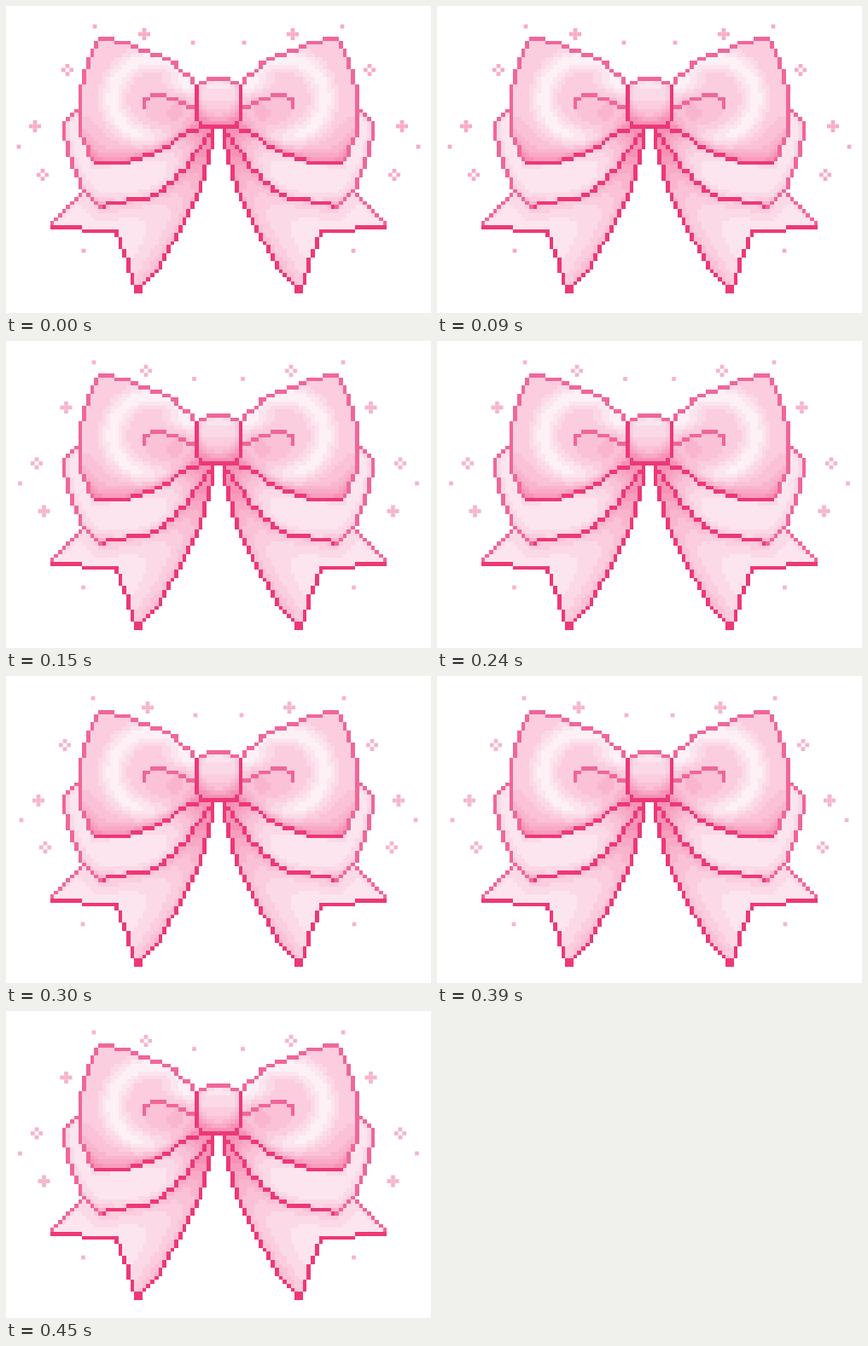
An HTML page with a canvas for the animation above (0.6 s loop, 498 by 360 pixels).

```html
<!DOCTYPE html>
<html lang="en">
<head>
<meta charset="utf-8">
<title>Pink bow</title>
<style>
  html, body { margin: 0; width: 100%; height: 100%; overflow: hidden; background: #fff; }
  canvas { display: block; }
</style>
</head>
<body>
<canvas id="stage" width="498" height="360"></canvas>
<script>
const ctx = document.getElementById('stage').getContext('2d');
const CELL = 4.7, MID = 249, TOP = 36, HALF = 42, ROWS = 64;
const DARK = '#ee3875', ROSE = '#f0669b';

const bow = document.createElement('canvas');
bow.width = HALF * 2;
bow.height = ROWS;
const pix = bow.getContext('2d');

// Each cell is painted together with its mirror image.
function put(col, row, color) {
  pix.fillStyle = color;
  pix.fillRect(HALF - 1 - col, row, 1, 1);
  pix.fillRect(HALF + col, row, 1, 1);
}
const toCell = ([x, y]) => [Math.floor((MID - x) / CELL), Math.floor((y - TOP) / CELL)];

// Catmull-Rom curve through a few key points.
function curve(...keys) {
  const out = [], steps = 3;
  for (let i = 0; i < keys.length - 1; i++) {
    const a = keys[Math.max(i - 1, 0)], b = keys[i], c = keys[i + 1];
    const d = keys[Math.min(i + 2, keys.length - 1)];
    for (let s = 0; s < steps; s++) {
      const t = s / steps;
      out.push([0, 1].map(k => b[k] + 0.5 * t * (c[k] - a[k] +
        t * (2 * a[k] - 5 * b[k] + 4 * c[k] - d[k] +
        t * (3 * b[k] - a[k] - 3 * c[k] + d[k])))));
    }
  }
  return [...out, keys[keys.length - 1]];
}

function line(points, color) {
  for (let i = 1; i < points.length; i++) {
    const [x0, y0] = toCell(points[i - 1]), [x1, y1] = toCell(points[i]);
    const n = Math.max(Math.abs(x1 - x0), Math.abs(y1 - y0), 1);
    for (let k = 0; k <= n; k++) {
      put(Math.round(x0 + (x1 - x0) * k / n), Math.round(y0 + (y1 - y0) * k / n), color);
    }
  }
}

// 0 is nearly white, 1 the deepest pink, in even steps.
function shade(tone) {
  const k = Math.round(Math.max(0, Math.min(1, tone)) * 8) / 8;
  return `rgb(${253 - 5 * k}, ${241 - 96 * k}, ${246 - 64 * k})`;
}

function fill(points, tone) {
  const path = new Path2D();
  points.forEach(p => path.lineTo(...p));
  path.closePath();
  for (let row = 0; row < ROWS; row++) {
    for (let col = 0; col < HALF; col++) {
      const x = MID - (col + 0.5) * CELL, y = TOP + (row + 0.5) * CELL;
      if (pix.isPointInPath(path, x, y)) put(col, row, shade(tone(x, y)));
    }
  }
}

// Light and shade: fading from an edge, or around a spot.
function nearEdge(points, x, y, reach) {
  let best = Infinity;
  for (let i = 1; i < points.length; i++) {
    const [ax, ay] = points[i - 1], [bx, by] = points[i];
    const dx = bx - ax, dy = by - ay;
    const t = ((x - ax) * dx + (y - ay) * dy) / (dx * dx + dy * dy || 1);
    const k = Math.max(0, Math.min(1, t));
    best = Math.min(best, Math.hypot(x - ax - k * dx, y - ay - k * dy));
  }
  return Math.exp(-best / reach);
}
const bell = v => Math.exp(-v * v);
const nearKnot = (x, y, reach) => bell(Math.hypot(x - 232, y - 138) / reach);

const loopTop = curve([87, 106], [91, 84], [98, 64], [112, 39], [125, 39], [152, 47],
  [188, 62], [212, 80], [222, 93]);
const loopSide = curve([87, 106], [87, 140], [94, 164], [104, 186]);
const loopHem = curve([104, 186], [140, 182], [176, 170], [206, 153], [240, 141]);
const crease = curve([163, 118], [166, 107], [180, 104], [202, 111], [222, 122]);
const underSide = curve([86, 122], [71, 130], [70, 150], [76, 184], [93, 217], [113, 234]);
const underHem = curve([113, 234], [148, 228], [184, 215], [206, 195], [224, 171], [241, 146]);
const tailTop = [[86, 220], [53, 256]];
const tailHem = [[53, 258], [130, 266]];
const tailSide = curve([130, 266], [139, 288], [147, 317], [153, 334]);
const tailEdge = curve([157, 334], [184, 295], [204, 265], [219, 235], [231, 204],
  [238, 176], [242, 146]);

fill([...tailTop, ...tailHem, ...tailSide, ...tailEdge, [200, 150]], (x, y) =>
  0.02 + 0.55 * nearEdge(tailEdge, x, y, 24) + 0.5 * nearEdge(underHem, x, y, 14) +
  0.2 * nearEdge(tailTop, x, y, 12) + 0.35 * nearKnot(x, y, 55));
line(tailTop, ROSE);
[tailHem, tailSide, tailEdge].forEach(p => line(p, DARK));

fill([...underSide, ...underHem, [200, 140]], (x, y) =>
  0.02 + 0.42 * nearEdge(underHem, x, y, 9) + 0.35 * nearEdge(underSide, x, y, 9) +
  0.25 * nearEdge(loopHem, x, y, 9) + 0.6 * nearKnot(x, y, 48));
line(underSide, ROSE);
line(underHem, DARK);

// A bright ring circles the crease of the upper loop.
fill([...loopTop, [240, 100], ...loopHem.slice().reverse(), ...loopSide.slice().reverse()], (x, y) => {
  const ring = Math.hypot((x - 174) / 49, (y - 108) / 47);
  const low = Math.max(0, Math.min(1, (y - 125) / 50));
  return 0.42 - 0.42 * bell((ring - 1) / 0.3) - 0.3 * bell(Math.hypot((x - 205) / 22, (y - 92) / 12)) +
    0.65 * nearEdge(loopHem, x, y, 9) + 0.45 * low * nearEdge(loopSide, x, y, 12) +
    0.6 * nearKnot(x, y, 38);
});
line(loopTop, ROSE);
line(loopSide, ROSE);
line(loopHem, DARK);
line(crease, ROSE);

const knotTop = [[248, 85], [235, 85], [231, 90], [227, 90], [223, 95]];
const knotSide = [[223, 95], [223, 130], [228, 136]];
fill([[249, 85], ...knotTop, ...knotSide, [230, 142], [249, 142]], (x, y) =>
  0.1 + 0.6 * Math.max(0, (y - 92) / 48) + 0.35 * Math.max(0, Math.hypot(x - 249, y - 110) - 18) / 10);
line(knotTop, ROSE);
line(knotSide, DARK);
line([[231, 141], [248, 141]], DARK);

// Left-hand sparkles: start x, y and drift per step; the right side mirrors them.
const dots = [[104, 24, -1, 1], [219, 43, 1.5, 1.5], [15, 165, 1.5, 2], [91, 287, -0.5, 2]];
const stars = [[162, 33, 2, 2], [72, 75, -1.5, 3], [34, 141, 2, 2.5], [43, 198, 1.5, 1.5]];

function square(x, y) {
  ctx.fillRect(x - CELL / 2, y - CELL / 2, CELL, CELL);
}
function star(x, y, solid) {
  for (const s of [-CELL, CELL]) {
    square(x + s, y);
    square(x, y + s);
  }
  if (solid) square(x, y);
}

function render(t) {
  const phase = Math.floor(t / 150) % 4;
  const step = phase < 3 ? phase : 1;
  ctx.fillStyle = '#fff';
  ctx.fillRect(0, 0, 498, 360);
  ctx.filter = 'blur(0.6px)';
  ctx.imageSmoothingEnabled = false;
  ctx.drawImage(bow, MID - HALF * CELL, TOP + 2 * step, HALF * 2 * CELL, ROWS * CELL);
  ctx.fillStyle = step ? '#f6b5cb' : '#f8abc5';
  const bothSides = (list, draw) => list.forEach(([x, y, vx, vy], i) => {
    const px = x + vx * step, py = y + vy * step;
    draw(px, py, i);
    draw(2 * MID - px, py, i);
  });
  bothSides(dots, square);
  bothSides(stars, (x, y, i) => star(x, y, (i + step) % 2 === 0));
  ctx.filter = 'none';
}

const start = performance.now();
function tick() {
  render(performance.now() - start);
  requestAnimationFrame(tick);
}
tick();
</script>
</body>
</html>
```
